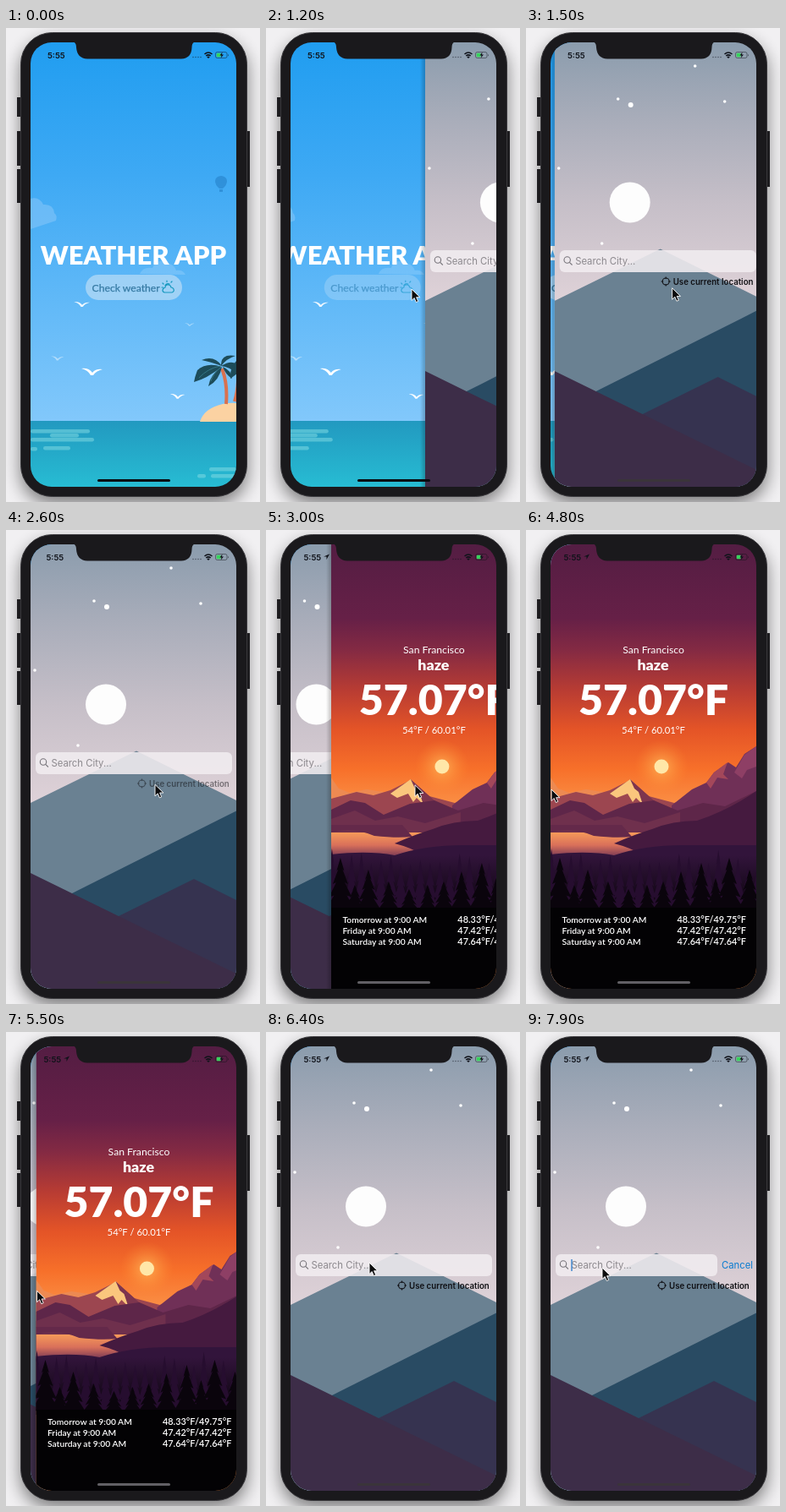
Animation, 300 px wide and 561 px high, one loop 8000 ms. Source, as an HTML page:

```html
<!DOCTYPE html>
<html lang="en">
<head>
<meta charset="utf-8">
<title>Weather app</title>
<style>
html, body { margin: 0; width: 100%; height: 100%; overflow: hidden; background: #f1f0f2; }
svg { display: block; width: 100vw; height: 100vh; }
.geo { font-family: Lato, "Open Sans", sans-serif; }
.ui { font-family: Inter, Roboto, sans-serif; }
.mid { text-anchor: middle; }
</style>
</head>
<body>
<svg viewBox="0 0 300 561">
<defs>
  <linearGradient id="sky" x2="0" y2="1"><stop stop-color="#209df0"/><stop offset=".35" stop-color="#3ea9f4"/><stop offset="1" stop-color="#82c8fb"/></linearGradient>
  <linearGradient id="sea" x2="0" y2="1"><stop stop-color="#2299c0"/><stop offset="1" stop-color="#27bcd3"/></linearGradient>
  <linearGradient id="dusk" gradientUnits="userSpaceOnUse" x1="0" y1="17" x2="0" y2="325"><stop stop-color="#8b9cad"/><stop offset=".3" stop-color="#a9adba"/><stop offset=".62" stop-color="#c6bfc8"/><stop offset="1" stop-color="#dfd2d8"/></linearGradient>
  <linearGradient id="sunset" gradientUnits="userSpaceOnUse" x1="0" y1="17" x2="0" y2="330"><stop stop-color="#541d43"/><stop offset=".28" stop-color="#662047"/><stop offset=".4" stop-color="#842a43"/><stop offset=".55" stop-color="#b83c33"/><stop offset=".7" stop-color="#e45427"/><stop offset=".85" stop-color="#f7702a"/><stop offset="1" stop-color="#fb9348"/></linearGradient>
  <linearGradient id="lake" x2="0" y2="1"><stop stop-color="#f69a59"/><stop offset=".5" stop-color="#d9705a"/><stop offset="1" stop-color="#6f3354"/></linearGradient>
  <linearGradient id="ground" gradientUnits="userSpaceOnUse" x1="0" y1="385" x2="0" y2="455"><stop stop-color="#32143b"/><stop offset="1" stop-color="#050206"/></linearGradient>
  <linearGradient id="edge"><stop stop-color="#000" stop-opacity="0"/><stop offset="1" stop-color="#000" stop-opacity=".22"/></linearGradient>
  <radialGradient id="glow"><stop stop-color="#ffc060" stop-opacity=".75"/><stop offset="1" stop-color="#ff8a30" stop-opacity="0"/></radialGradient>
  <filter id="blur" x="-20%" y="-20%" width="140%" height="140%"><feGaussianBlur stdDeviation="10"/></filter>
  <clipPath id="screen"><rect x="29" y="17" width="243" height="526" rx="25"/></clipPath>
  <clipPath id="page"><rect x="29" y="17" width="243" height="526"/></clipPath>
</defs>

<rect width="300" height="561" fill="#f1f0f2"/>
<rect x="17" y="14" width="268" height="550" rx="38" fill="#000" opacity=".48" filter="url(#blur)"/>
<path d="M13 82h6v23h-6zM13 122h6v41h-6zM13 167h6v40h-6zM282 122h6v66h-6z" fill="#1d1c1f"/>
<rect x="17.5" y="5.5" width="267" height="549" rx="37" fill="#1a191c" stroke="#39383c"/>

<g clip-path="url(#screen)">
  <g id="home"><g clip-path="url(#page)">
    <rect x="29" y="17" width="243" height="449" fill="url(#sky)"/>
    <path d="M29 202q10-3 15 7 12-1 13 10 4 3 2 9L29 238z" fill="#8dcafa" opacity=".5"/>
    <path d="M158 291q4-9 15-7 5-12 17-6 9 2 11 9 8-1 11 5z" fill="#a2d4fc" opacity=".35"/>
    <g fill="#2784cd" opacity=".65"><path d="M247 181a7 6 0 0 1 14 0q0 5-5 9h-4q-5-4-5-9z"/><path d="M252 191h4v3h-4z"/></g>
    <g id="birds" fill="#fff"></g>
    <rect x="29" y="465" width="243" height="78" fill="url(#sea)"/>
    <g id="ripples" fill="#7ed9e2" opacity=".55"></g>
    <path d="M229 466q5-16 27-21 10-2 16-1v22z" fill="#fbd2a2"/>
    <path d="M255 403q7 18 5 42M274 403q1 23-4 39" fill="none" stroke="#d9714f" stroke-width="4"/>
    <g fill="#1d4c5a"><path d="M255 401q-18-6-29 4-3 8-4 14 15-4 33-18z"/><path d="M255 400q-9-13-24-7 10 2 24 7z"/><path d="M254 400q-1-15 17-12-10 3-17 12z"/><path d="M254 400q13-8 19-1v11q-8-9-19-10z"/><path d="M255 401q-14 9-16 23 13-7 16-23z"/><path d="M256 401q10 4 11 14-8-5-11-14z"/><path d="M273 393q-9 8-8 22l8-6z"/></g>
    <path d="M253 400q-15 3-25 14M254 401q-10 9-12 17" stroke="#347684" fill="none"/>
    <text class="geo mid" x="150.5" y="279.5" font-size="31" font-weight="900" fill="#fff">WEATHER APP</text>
    <g id="check">
      <rect x="94" y="292" width="114" height="30" rx="15" fill="#d5e8f6" opacity=".55"/>
      <text class="geo" x="101.500" y="312" font-size="12.2" fill="#367aa3" stroke="#367aa3" stroke-width=".25">Check weather</text>
      <g fill="none" stroke="#1698bf" stroke-width="1.2" stroke-linecap="round"><path d="M187.500 313h8.500q3-1 2-4-1-2-3-2-1-4-5-3-2 1-2 3-3 1-3 3.500 0 2 2.500 2.500zM188 305a3.500 3.500 0 0 1 5-2M185 302l1 1M190 299v1.500M184 307h1.500M195 301l1-1"/></g>
    </g>
  </g></g>

  <g id="night">
    <g clip-path="url(#page)">
      <rect x="29" y="17" width="243" height="526" fill="url(#dusk)"/>
      <g id="stars" fill="#fff"></g>
      <circle cx="118" cy="206.500" r="24" fill="#fdfdfd"/>
      <path d="M29 323L154 261.500 272 320V543H29z" fill="#6a8192"/>
      <path d="M78 430L272 332.500V543H78z" fill="#294b63"/>
      <path d="M133 457L222 413 272 438V543H133z" fill="#363350"/>
      <path d="M29 406L133 457 272 525V543H29z" fill="#3d2d48"/>
      <rect id="field" x="35" y="263" width="232" height="26" rx="6" fill="#f2edf0" opacity=".87"/>
      <g fill="none" stroke="#77747a" stroke-width="1.100"><circle cx="44" cy="274.500" r="3.700"/><path d="M46.700 277.300l3.200 3.200"/></g>
      <text class="ui" x="53.500" y="280" font-size="11.300" fill="#8c888d">Search City...</text>
      <path id="caret" d="M54 269v14" stroke="#2879c9" stroke-width="1.300"/>
      <text id="cancel" class="ui" x="231" y="280" font-size="11.300" fill="#087bd0">Cancel</text>
      <g id="locate" fill="#101014">
        <g fill="none" stroke="#101014" stroke-width="1.100"><circle cx="160.500" cy="300" r="4"/><path d="M160.500 294.500v2.500M160.500 303v2.500M155 300h2.500M163.500 300h2.500"/></g>
        <text class="ui" x="169" y="303.500" font-size="9.700" font-weight="600">Use current location</text>
      </g>
    </g>
    <rect x="23" y="17" width="6" height="526" fill="url(#edge)"/>
  </g>

  <g id="weather">
    <g clip-path="url(#page)">
      <rect x="29" y="17" width="243" height="526" fill="url(#sunset)"/>
      <circle cx="160" cy="280" r="32" fill="url(#glow)"/>
      <circle cx="160" cy="280" r="8.500" fill="#ffe7a8"/>
      <path d="M29 293l9 13 13 5 20-4 20 3V335H29z" fill="#ed8a52"/>
      <path d="M29 318l30-8 20 4 20-6 24-12 22 19 30 8 20-6V350H29z" fill="#9c4650"/>
      <path d="M123 295l20 20-5 10-8-8-4 5-6-10-13 5-8-5z" fill="#fac67d"/>
      <path d="M123 295l5 11 5 4 5 15 15-3z" fill="#7d354e"/>
      <path d="M172 326l24-19 17-8 9-12 17-12 9 6 10-16 14-9V370H172z" fill="#703057"/>
      <path d="M213 299l9-12 16-12-5 14 6 6-13-2-8 13z" fill="#a3475a"/>
      <path d="M246 287l12-21 14-10v24l-11 4-6 10z" fill="#8e3f65"/>
      <path d="M29 331l23-11 17 3 22 14 31-13 29-4 28 12 30-9 26 4 37-18V390H29z" fill="#5e2649"/>
      <path d="M29 342l28-10 24 12 27-5 32 8 42-13V385H29z" fill="#6f304d"/>
      <rect x="29" y="358" width="120" height="30" fill="url(#lake)"/>
      <path d="M29 358q25-7 51 4 27 3 45 1l-12-14H29z" fill="#64294a"/>
      <path d="M104 371q25-11 45-17 24-10 53-10 36-12 70-35v90H145q-2-18-41-28z" fill="#451a3f"/>
      <path d="M29 384q44-5 75 1 36-12 80-12h88v80H29z" fill="url(#ground)"/>
      <path id="backTrees" fill="#260d2f"/>
      <path id="frontTrees" fill="#0a040c"/>
      <rect x="29" y="447" width="243" height="96" fill="#030204"/>
      <g class="geo" fill="#fff">
        <g class="mid">
          <text x="150.500" y="146" font-size="12.200">San Francisco</text>
          <text x="150" y="166" font-size="17.800" font-weight="900">haze</text>
          <text x="150.500" y="219" font-size="50" font-weight="900">57.07°F</text>
          <text x="150.500" y="241" font-size="11.300">54°F / 60.01°F</text>
        </g>
        <g id="forecast" font-weight="600"></g>
      </g>
    </g>
    <rect x="23" y="17" width="6" height="526" fill="url(#edge)"/>
  </g>

  <path d="M77 16q6 0 6 7 1 13 13 13.500H207q12-.5 12.500-13.500 0-7 6-7z" fill="#1a191c"/>
  <g fill="#10131a">
    <text id="clock" class="ui" y="36" font-size="9.600" font-weight="600">5:55</text>
    <path id="arrow" d="M75 28.500l-7 3h3.500v3.500z"/>
    <g opacity=".5"><circle cx="221" cy="34.500" r=".8"/><circle cx="224" cy="34.500" r=".8"/><circle cx="227" cy="34.500" r=".8"/><circle cx="230" cy="34.500" r=".8"/></g>
    <g fill="none" stroke="#10131a" stroke-width="1.600"><path d="M234.500 31q4.500-4 9 0M236.300 33q2.700-2.400 5.400 0"/></g>
    <path d="M237.200 34.200q1.800-1.200 3.600 0L239 36z"/>
    <rect x="247.500" y="28.500" width="13.500" height="7" rx="2" fill="none" stroke="#10131a" stroke-opacity=".5" stroke-width=".9"/>
    <path d="M262 31v2.300q1-.2 1-1.150t-1-1.150z" opacity=".5"/>
    <rect x="248.700" y="29.700" width="5" height="4.600" rx="1" fill="#38d35d"/>
    <path d="M255.500 28.500l-3 4h2l-.8 3 3.300-4h-2z"/>
  </g>
  <rect id="bar" x="108" y="534" width="86" height="3" rx="1.500"/>
</g>
<path id="cursor" d="M0 0v13.500l3.200-3 2.100 5 2.400-1-2.100-4.800h4.300z" fill="#0b0b0d" stroke="#fff" stroke-width=".9"/>
</svg>

<script>
const LOOP = 8000, WIDTH = 243;
const el = Object.fromEntries([...document.querySelectorAll('g[id], rect[id], path[id], text[id]')].map(n => [n.id, n]));
const set = (node, attrs) => { for (const k in attrs) node.setAttribute(k, attrs[k]); };
const clamp = v => Math.max(0, Math.min(1, v));
const part = (t, from, length) => clamp((t - from) / length);
const easeOut = p => 1 - (1 - p) ** 3;
const smooth = p => p * p * (3 - 2 * p);
const mix = (a, b, p) => a + (b - a) * p;

// Scenery
el.birds.innerHTML = [[90, 327, .75, .9], [102, 407, 1, 1], [61, 391, .6, .45], [203, 436, .7, .95], [217, 351, .45, .4]]
  .map(([x, y, s, o]) => `<path transform="translate(${x} ${y}) scale(${s})" opacity="${o}" d="M-13-4Q-4-5 0 1 4-4 12-3 4-1 1 4L-2 4Q-5-2-13-4z"/>`).join('');
el.ripples.innerHTML = [[29, 475, 70], [52, 480, 34], [29, 485, 75], [44, 495, 32], [29, 496, 8], [240, 520, 32], [226, 528, 10], [242, 528, 30]]
  .map(([x, y, w]) => `<rect x="${x}" y="${y}" width="${w}" height="4.500" rx="2.200"/>`).join('');
el.stars.innerHTML = [[195, 45], [104, 84], [119, 91, 3], [230, 87], [34, 166], [85, 255]]
  .map(([x, y, r = 1.8]) => `<circle cx="${x}" cy="${y}" r="${r}"/>`).join('');

function tree(x, top, half) {
  const step = (450 - top) / 4;
  let left = '', right = '';
  for (let i = 1; i <= 4; i++) {
    const w = half * i / 4, y = top + step * i;
    right += `L${x + w} ${y}L${x + w * .55} ${y - 2}`;
    left = `L${x - w * .55} ${y - 2}L${x - w} ${y}` + left;
  }
  return `M${x} ${top}${right}${left}z`;
}
let seed = 7;
const random = () => (seed = seed * 16807 % 2147483647) / 2147483647;
set(el.backTrees, { d: Array.from({ length: 22 }, (_, i) => tree(30 + i * 11.6, 377 + random() * 24, 10)).join('') });
set(el.frontTrees, { d: [[40, 388, 18], [73, 402, 15], [57, 420, 12], [97, 416, 13], [121, 425, 12], [143, 420, 11],
  [162, 416, 13], [183, 404, 14], [207, 394, 16], [224, 412, 12], [240, 388, 18], [264, 402, 15]].map(a => tree(...a)).join('') });
el.forecast.innerHTML = [['Tomorrow', '48.33°F/49.75°F'], ['Friday', '47.42°F/47.42°F'], ['Saturday', '47.64°F/47.64°F']]
  .map(([day, range], i) => `<text x="42.500" y="${465 + i * 13}" font-size="10.300">${day} at 9:00 AM</text>
    <text x="260" y="${465 + i * 13}" font-size="10.900" text-anchor="end">${range}</text>`).join('');

// Pointer path: time, x, y
const path = [[350, 304, 430], [900, 172, 309], [1300, 172, 309], [2100, 176, 301], [3400, 176, 302], [4400, 30, 307],
  [5450, 30, 307], [5850, 175, 290], [6300, 122, 273], [6700, 122, 273], [7200, 90, 279], [8000, 90, 279]];
function pointer(t) {
  const i = Math.max(1, path.findIndex(k => k[0] > t));
  const [a, b] = [path[i - 1], path[i]];
  const p = smooth(part(t, a[0], b[0] - a[0]));
  return [mix(a[1], b[1], p), mix(a[2], b[2], p)];
}

const press = (t, down, up) => 1 - .5 * part(t, down, 100) * (1 - part(t, up, 250));
const slide = (node, x) => set(node, { transform: `translate(${x})`, visibility: Math.abs(x) < WIDTH + 7 ? 'visible' : 'hidden' });

function render(t) {
  const toNight = easeOut(part(t, 1135, 500));
  let toWeather = easeOut(part(t, 2792, 500));
  if (t > 5450) {
    const dragged = (pointer(Math.min(t, 5850))[0] - 30) / WIDTH;
    toWeather = 1 - mix(dragged, 1, easeOut(part(t, 5850, 350)));
  }
  slide(el.home, -WIDTH * .3 * toNight);
  slide(el.night, toNight < 1 ? WIDTH * (1 - toNight) + (toNight ? 0 : 10) : -WIDTH * .3 * toWeather);
  slide(el.weather, toWeather ? WIDTH * (1 - toWeather) : WIDTH + 10);
  set(el.check, { opacity: press(t, 1000, 1200) });
  set(el.locate, { opacity: press(t, 2480, 2620) });

  const focus = smooth(part(t, 7350, 250));
  set(el.field, { width: mix(232, 191, focus) });
  set(el.cancel, { opacity: focus, x: mix(272, 231, focus) });
  set(el.caret, { opacity: t > 7450 ? 1 : 0 });

  const located = t > 2700;
  set(el.clock, { x: located ? 44.5 : t > 1700 ? 47.5 : 49 });
  set(el.arrow, { opacity: located ? 1 : 0 });
  set(el.bar, { fill: t < 1300 ? '#080a10' : t > 2850 && t < 6000 ? '#626065' : '#3a343a' });

  const [x, y] = pointer(t);
  set(el.cursor, { transform: `translate(${x} ${y})`, opacity: t > 350 ? 1 : 0 });
}

const start = performance.now();
function tick() {
  render((performance.now() - start) % LOOP);
  requestAnimationFrame(tick);
}
tick();
</script>
</body>
</html>
```
